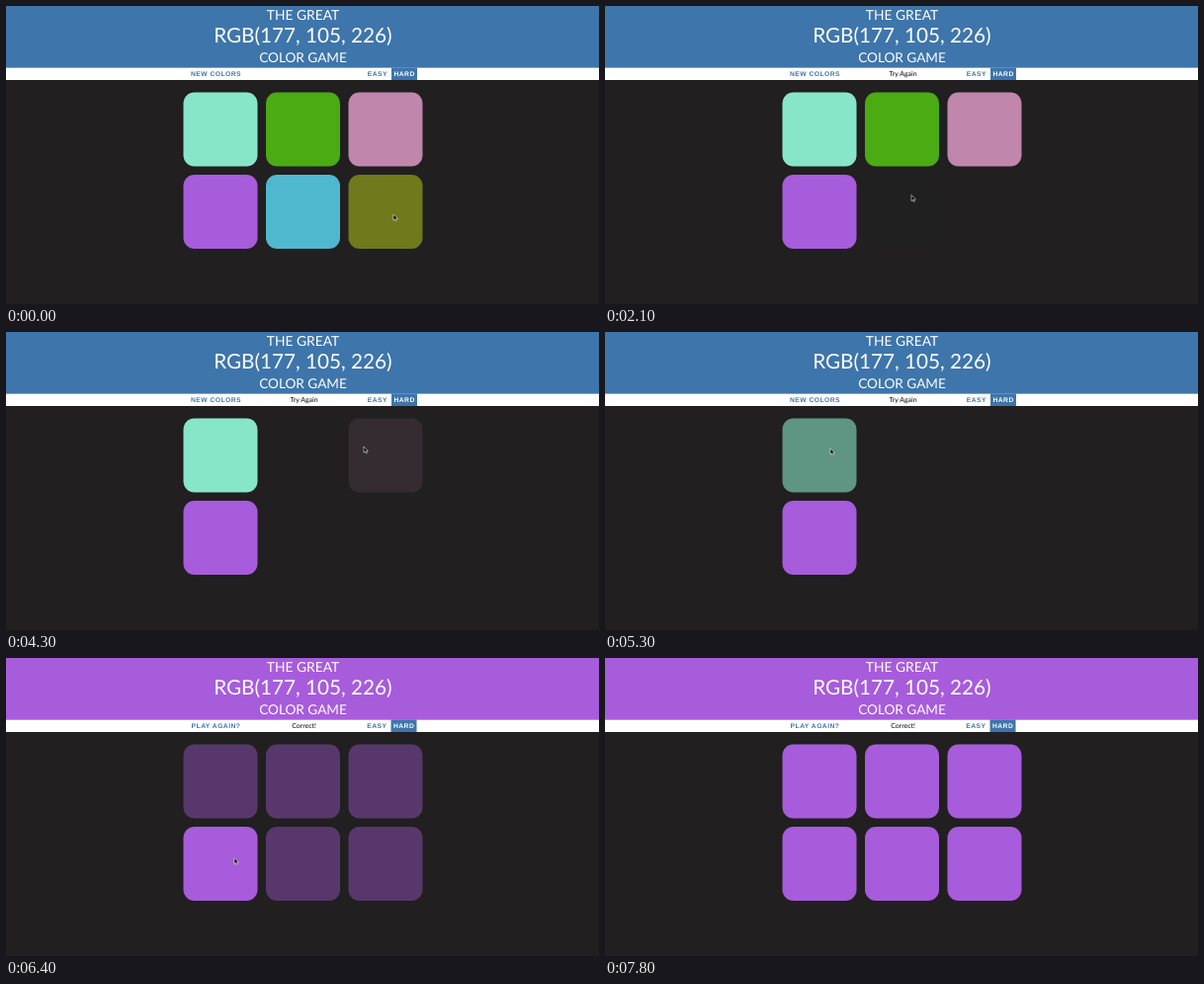
Write an HTML page that moves like this. It is 600 px wide and 302 px high and loops after 7.9 s.

```html
<!DOCTYPE html>
<html lang="en">
<head>
<meta charset="utf-8">
<title>Color Game</title>
<style>
  html, body { margin: 0; width: 100%; height: 100%; overflow: hidden; background: #211f20; }
  svg { display: block; width: 100%; height: 100%; }
  text { text-rendering: geometricPrecision; }
  .title { font-family: Lato, "Open Sans", sans-serif; fill: #fff; text-anchor: middle; }
  .message { font: 500 6.9px Lato, "Open Sans", sans-serif; fill: #151515; text-anchor: middle; }
  .button { font: bold 6.7px "Liberation Sans", Arial, sans-serif; letter-spacing: .5px; fill: #3e75ab; }
</style>
</head>
<body>
<svg viewBox="0 0 600 302">
  <rect width="600" height="302" fill="#211f20"/>
  <rect id="header" width="600" height="62.5"/>
  <g class="title">
    <text x="300.5" y="14.3" font-size="13.8">THE GREAT</text>
    <text x="300.3" y="37" font-size="20.7">RGB(177, 105, 226)</text>
    <text x="300.5" y="57" font-size="13.6">COLOR GAME</text>
  </g>
  <rect y="62.5" width="600" height="12.5" fill="#fff"/>
  <text id="reset" class="button" x="187" y="71.2"></text>
  <text id="message" class="message" x="301.5" y="71.3"></text>
  <g id="modes">
    <rect x="390" y="62.5" width="26" height="12.5" fill="#3e75ab"/>
    <text class="button" x="365.7" y="71.2">EASY</text>
    <text class="button" x="392.4" y="71.2" style="fill:#fff">HARD</text>
  </g>
  <g id="tiles"></g>
  <path id="cursor" d="M0 0V6.2L1.4 4.9L2.3 7L3.4 6.5L2.5 4.6H4.3Z"
        fill="#000" stroke="#fff" stroke-width=".55" stroke-linejoin="round"/>
</svg>
<script>
const LOOP = 7900, STEP = 100, FADE = 600;
const WIN = 6250, CURSOR_OFF = 7500;
const DARK = [33, 31, 32], PURPLE = [167, 92, 219], BLUE = [62, 117, 171];

// Tile colour and the time of the wrong click on it
const tiles = [
  { color: [136, 230, 200], click: 5150 },
  { color: [74, 171, 19], click: 2850 },
  { color: [192, 134, 171], click: 3950 },
  { color: PURPLE, click: Infinity },
  { color: [80, 184, 206], click: 1550 },
  { color: [111, 122, 28], click: 250 }
];
const firstClick = Math.min(...tiles.map(tile => tile.click));

// Cursor stops: arrival, departure, x, y
const stops = [
  [0, 600, 392, 211],
  [1200, 1900, 309.5, 210],
  [2600, 3200, 312, 116.5],
  [3700, 4300, 362, 116],
  [4950, 5500, 228, 118],
  [6050, LOOP, 231, 202.5]
];

const $ = id => document.getElementById(id);
const clamp = v => Math.min(1, Math.max(0, v));
const mix = (a, b, p) => a.map((v, i) => v + (b[i] - v) * p);
const rgb = c => `rgb(${c.map(Math.round).join(",")})`;
const smooth = p => p * p * (3 - 2 * p);

// CSS "ease": cubic-bezier(.25, .1, .25, 1)
function ease(x) {
  if (x <= 0 || x >= 1) return clamp(x);
  const bezier = (s, a, b) => 3 * (1 - s) ** 2 * s * a + 3 * (1 - s) * s * s * b + s ** 3;
  let lo = 0, hi = 1;
  for (let i = 0; i < 20; i++) {
    const mid = (lo + hi) / 2;
    if (bezier(mid, .25, .25) < x) lo = mid; else hi = mid;
  }
  return bezier(lo, .1, 1);
}

tiles.forEach((tile, i) => {
  tile.node = document.createElementNS("http://www.w3.org/2000/svg", "rect");
  const box = { x: 179.5 + i % 3 * 83.5, y: 87.5 + Math.floor(i / 3) * 83.5, width: 75, height: 75, rx: 11.25 };
  for (const key in box) tile.node.setAttribute(key, box[key]);
  $("tiles").append(tile.node);
});

function cursorAt(t) {
  const i = stops.findLastIndex(stop => t >= stop[0]);
  const [, leave, x, y] = stops[i];
  if (t <= leave || i === stops.length - 1) return [x, y];
  const [arrive, , nextX, nextY] = stops[i + 1];
  return mix([x, y], [nextX, nextY], smooth((t - leave) / (arrive - leave)));
}

function draw(t) {
  const won = t >= WIN;
  $("header").setAttribute("fill", rgb(won ? PURPLE : BLUE));
  $("reset").textContent = won ? "PLAY AGAIN?" : "NEW COLORS";
  $("reset").setAttribute("x", won ? 187.6 : 187);
  $("message").textContent = won ? "Correct!" : t >= firstClick ? "Try Again" : "";
  $("modes").setAttribute("transform", `translate(${won ? -.5 : 0} 0)`);
  for (const { color, click, node } of tiles) {
    const faded = mix(color, DARK, ease((t - click) / FADE));
    node.setAttribute("fill", rgb(mix(faded, PURPLE, ease((t - WIN) / FADE))));
  }
  $("cursor").setAttribute("transform", `translate(${cursorAt(t).join(" ")})`);
  $("cursor").setAttribute("visibility", t < CURSOR_OFF ? "visible" : "hidden");
}

const start = performance.now();
function tick() {
  const t = (performance.now() - start) % LOOP;
  draw(Math.floor(t / STEP) * STEP);
  requestAnimationFrame(tick);
}
tick();
</script>
</body>
</html>
```
